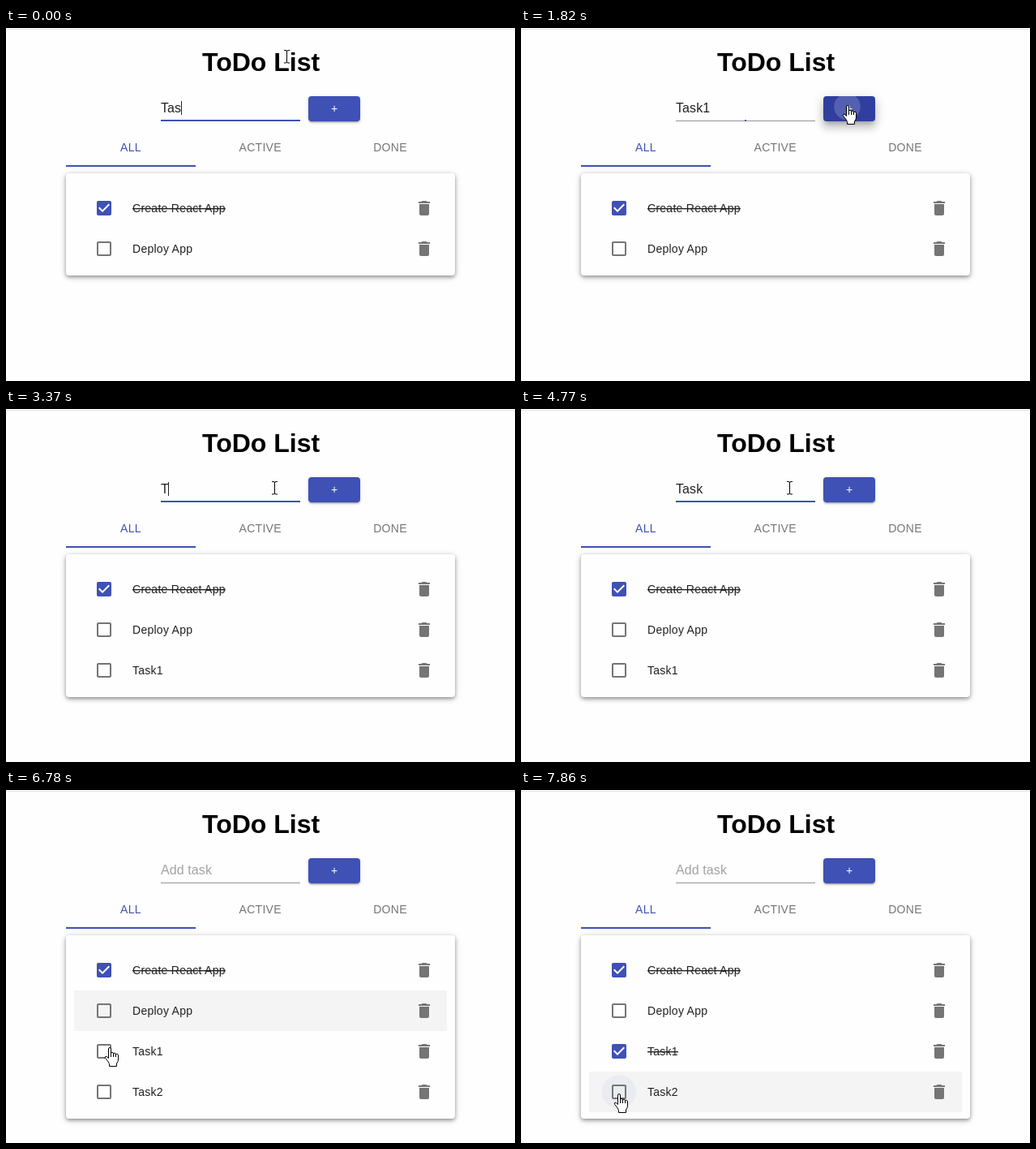
Animation of 628 by 435 pixels, one loop 8 s. Source, as an HTML page:

```html
<!DOCTYPE html>
<html lang="en">
<head>
<meta charset="utf-8">
<title>ToDo List</title>
<style>
  html, body { margin: 0; width: 100%; height: 100%; overflow: hidden; background: #fefefe; }
  .paper, .button { position: absolute; border-radius: 4px; }
  .paper {
    left: 74px; top: 179px; width: 480px; background: #fefefe;
    box-shadow: 0 2px 4px rgba(0,0,0,.32), 0 2px 8px rgba(0,0,0,.2);
  }
  .button {
    left: 373px; top: 84px; width: 64px; height: 31px;
    box-shadow: 0 3px 1px -2px rgba(0,0,0,.2), 0 2px 2px rgba(0,0,0,.14), 0 1px 5px rgba(0,0,0,.12);
  }
  .button.hover {
    box-shadow: 0 2px 4px -1px rgba(0,0,0,.2), 0 4px 5px rgba(0,0,0,.14), 0 1px 10px rgba(0,0,0,.12);
  }
  .button.pressed {
    box-shadow: 0 5px 5px -3px rgba(0,0,0,.2), 0 8px 10px 1px rgba(0,0,0,.14), 0 3px 14px 2px rgba(0,0,0,.12);
  }
  svg { position: absolute; left: 0; top: 0; display: block; }
  text { font-family: "Liberation Sans", Arial, sans-serif; font-size: 14px; fill: #212121; white-space: pre; }
  .title { font-size: 32px; font-weight: bold; fill: #000; text-anchor: middle; }
  .tab { fill: #757575; letter-spacing: .3px; text-anchor: middle; }
  .tab.active { fill: #3f51b5; }
  .label { letter-spacing: .27px; }
  .field { font-size: 16px; letter-spacing: .1px; }
  .plus { fill: #fff; text-anchor: middle; }
</style>
</head>
<body>
<div class="paper" id="paper"></div>
<div class="button" id="button"></div>
<svg width="628" height="435" viewBox="0 0 628 435">
  <defs>
    <clipPath id="buttonClip"><rect x="373" y="84" width="64" height="31" rx="4"/></clipPath>
  </defs>
  <rect y="1" width="628" height="1" fill="#e2e2e2"/>
  <text class="title" x="314.6" y="53">ToDo List</text>

  <rect id="fieldTint" x="191" y="81" width="172" height="32"/>
  <text class="field" id="field" x="191" y="104"></text>
  <rect id="caret" y="90" width="1" height="17" fill="#212121"/>
  <rect id="line" x="191" width="172"/>
  <rect id="focusLine" y="113" height="2" fill="#3f51b5"/>

  <text class="plus" x="405" y="104">+</text>
  <g clip-path="url(#buttonClip)"><circle id="ripple" fill="#fff"/></g>

  <text class="tab active" x="154" y="152">ALL</text>
  <text class="tab" x="313.7" y="152">ACTIVE</text>
  <text class="tab" x="474" y="152">DONE</text>
  <rect x="74" y="169" width="160" height="2" fill="#3f51b5"/>

  <g id="rows"></g>

  <g id="cursor">
    <path id="beam" d="M-3.5-7.5h2q1.5 0 1.5 1.5q0-1.5 1.5-1.5h2M0-6.5V7M-3.5 8h2q1.5 0 1.5-1.5q0 1.5 1.5 1.5h2"
      transform="translate(.5 0)" fill="none" stroke="#000"/>
    <path id="arrow" d="M.5.5V16.5L4.2 13L6.6 18.6L9 17.6L6.6 12.1H11.8Z" fill="#fff" stroke="#000"/>
    <g id="hand" stroke="#000" stroke-linejoin="round">
      <path fill="#fff" d="M-1.5 13.5V2Q-1.5.5 0 .5T1.5 2V7.5Q1.6 6.3 3 6.3T4.5 8Q4.8 7.1 6 7.1T7.5 9Q8 8.2 9 8.2T10.5 10V15Q10.5 18 8.5 20V23.5H-.5V20.5Q-2 17-5.5 13.3Q-6.3 11.8-5 11.2Q-4 10.8-1.5 13.5Z"/>
      <path fill="none" d="M1.5 7v5M4.5 8v4M7.5 9v3"/>
    </g>
  </g>
</svg>
<script>
const LOOP = 8000, STEP = 140;
const KEY_GAP = 280, BLINK = 530;
const HOVER_LAG = 100;
const BOX = 'M19 5v14H5V5h14m0-2H5c-1.1 0-2 .9-2 2v14c0 1.1.9 2 2 2h14c1.1 0 2-.9 2-2V5c0-1.1-.9-2-2-2z';
const CHECKED = 'M19 3H5c-1.11 0-2 .9-2 2v14c0 1.1.89 2 2 2h14c1.11 0 2-.9 2-2V5c0-1.1-.89-2-2-2zm-9 14l-5-5 1.41-1.41L10 14.17l7.59-7.59L19 8l-9 9z';
const BIN = 'M6 19c0 1.1.9 2 2 2h8c1.1 0 2-.9 2-2V7H6v12zM19 4h-3.5l-1-1h-5l-1 1H5v2h14V4z';

// The user's session: pointer trips, typed entries and clicks, in ms.
const home = { x: 346, y: 35 };
const trips = [
  { start: 840, end: 1300, x: 403, y: 95 },
  { start: 1960, end: 2440, x: 331, y: 97 },
  { start: 5320, end: 5740, x: 407, y: 95 },
  { start: 6260, end: 6720, x: 128, y: 317 },
  { start: 7360, end: 7740, x: 121, y: 374 }
];
const entries = [
  { focus: -2000, typing: -700, digit: '1', digitAt: 420, press: 1635, added: 1950 },
  { focus: 2600, typing: 3360, digit: '2', digitAt: 4900, press: 5815, added: 5990 }
];
const check = { press: 7130, release: 7280 };
const tasks = [
  { name: 'Create React App', from: 0, done: 0 },
  { name: 'Deploy App', from: 0, done: Infinity },
  { name: 'Task1', from: entries[0].added, done: check.release },
  { name: 'Task2', from: entries[1].added, done: Infinity }
];

const area = (x, y, width, height) => ({ x, y, width, height });
const areas = {
  title: area(243, 22, 144, 38),
  field: area(191, 82, 172, 33),
  button: area(373, 84, 64, 31),
  tabs: area(74, 123, 480, 48),
  list: area(84, 197, 460, 200)
};

const $ = id => document.getElementById(id);
const set = (node, attrs) => {
  for (const name in attrs) node.setAttribute(name, attrs[name]);
};
const clamp = v => Math.max(0, Math.min(1, v));
const ease = v => {
  const p = clamp(v);
  return p < .5 ? 2 * p * p : 1 - 2 * (1 - p) ** 2;
};
// Rises after `from` and falls after `to`.
const pulse = (t, from, to, duration) => ease((t - from) / duration) - ease((t - to) / duration);

function pointerAt(t) {
  let { x, y } = home;
  for (const trip of trips) {
    const p = ease((t - trip.start) / (trip.end - trip.start));
    x += (trip.x - x) * p;
    y += (trip.y - y) * p;
  }
  return { x: Math.round(x), y: Math.round(y) };
}

const inside = (p, a) => p.x >= a.x && p.x < a.x + a.width && p.y >= a.y && p.y < a.y + a.height;

// Share of the recent time window that the pointer spent in the area.
function hovered(a, t, duration = 80) {
  const samples = 16;
  let hits = 0;
  for (let i = 0; i < samples; i++) {
    hits += inside(pointerAt(t - HOVER_LAG - duration * i / samples), a);
  }
  return hits / samples;
}

function create(parent, tag, attrs) {
  const node = document.createElementNS('http://www.w3.org/2000/svg', tag);
  set(node, attrs);
  return parent.appendChild(node);
}

tasks.forEach((task, i) => {
  const y = 222 + i * 50;
  task.row = area(84, y - 25, 460, 50);
  task.box = area(100, y - 21, 42, 42);
  task.group = create($('rows'), 'g', {});
  task.shade = create(task.group, 'rect', task.row);
  task.halo = create(task.group, 'circle', { cx: 121, cy: y, r: 21, fill: '#3f51b5' });
  task.icon = create(task.group, 'path', { transform: `translate(109 ${y - 12})` });
  task.text = create(task.group, 'text', { class: 'label', x: 156, y: y + 5 });
  task.text.textContent = task.name;
  create(task.group, 'path', { d: BIN, fill: '#757575', transform: `translate(504 ${y - 12})` });
});

function drawField(t, entry) {
  const keys = Math.max(0, Math.min(4, Math.floor((t - entry.typing) / KEY_GAP) + 1));
  const hasDigit = t >= entry.digitAt;
  const value = t < entry.added ? 'Task'.slice(0, keys) + (hasDigit ? entry.digit : '') : '';
  const field = $('field');
  field.textContent = value || 'Add task';
  field.style.fill = value ? '#212121' : '#a2a2a2';

  const lastInput = hasDigit ? entry.digitAt : keys ? entry.typing + (keys - 1) * KEY_GAP : entry.focus;
  const typing = t >= entry.focus && t < entry.press;
  set($('caret'), {
    x: Math.floor(191 + (value ? field.getComputedTextLength() : 0)),
    opacity: typing && (t - lastInput) % (2 * BLINK) < BLINK ? 1 : 0
  });

  const focus = pulse(t, entry.focus, entry.press, 200);
  const hover = hovered(areas.field, t) * (1 - focus);
  set($('fieldTint'), { opacity: hover * .018 });
  set($('line'), hover > .5
    ? { y: 113, height: 2, fill: '#7c7c7c' }
    : { y: 114, height: 1, fill: '#949494' });
  set($('focusLine'), { x: 277 - 86 * focus, width: 172 * focus });
}

function drawButton(t, { press, added }) {
  const hover = hovered(areas.button, t, 250);
  const mix = (a, b) => Math.round(a + (b - a) * hover);
  const button = $('button');
  button.style.background = `rgb(${mix(63, 48)},${mix(81, 63)},${mix(181, 159)})`;
  button.classList.toggle('hover', hover > .7);
  button.classList.toggle('pressed', t >= press && t < added + STEP);

  const origin = pointerAt(press);
  set($('ripple'), {
    cx: origin.x - .5,
    cy: origin.y + 2,
    r: 38 * ease((t - press) / 400),
    opacity: .2 * pulse(t, press, added, 250)
  });
}

function drawList(t) {
  $('paper').style.height = 26 + 50 * tasks.filter(task => t >= task.from).length + 'px';
  for (const task of tasks) {
    const done = t >= task.done;
    const pressed = task.done === check.release ? pulse(t, check.press, check.release, 200) : 0;
    task.group.style.display = t >= task.from ? '' : 'none';
    set(task.shade, { opacity: .04 * hovered(task.row, t) });
    set(task.halo, { opacity: .05 * hovered(task.box, t) + .14 * pressed });
    set(task.icon, { d: done ? CHECKED : BOX, fill: done ? '#3f51b5' : '#757575' });
    task.text.style.textDecoration = done ? 'line-through' : 'none';
  }
}

function drawCursor(t) {
  const p = pointerAt(t);
  const over = (...names) => names.some(name => inside(p, areas[name]));
  const shape = over('title', 'field') ? 'beam' : over('button', 'tabs', 'list') ? 'hand' : 'arrow';
  set($('cursor'), { transform: `translate(${p.x} ${p.y})` });
  for (const id of ['beam', 'arrow', 'hand']) $(id).style.display = id === shape ? '' : 'none';
}

function draw(t) {
  const entry = entries[t < entries[1].focus ? 0 : 1];
  drawField(t, entry);
  drawButton(t, entry);
  drawList(t);
  drawCursor(t);
}

const start = performance.now();
function loop() {
  const t = (performance.now() - start) % LOOP;
  draw(Math.floor(t / STEP) * STEP);
  requestAnimationFrame(loop);
}
loop();
</script>
</body>
</html>
```
